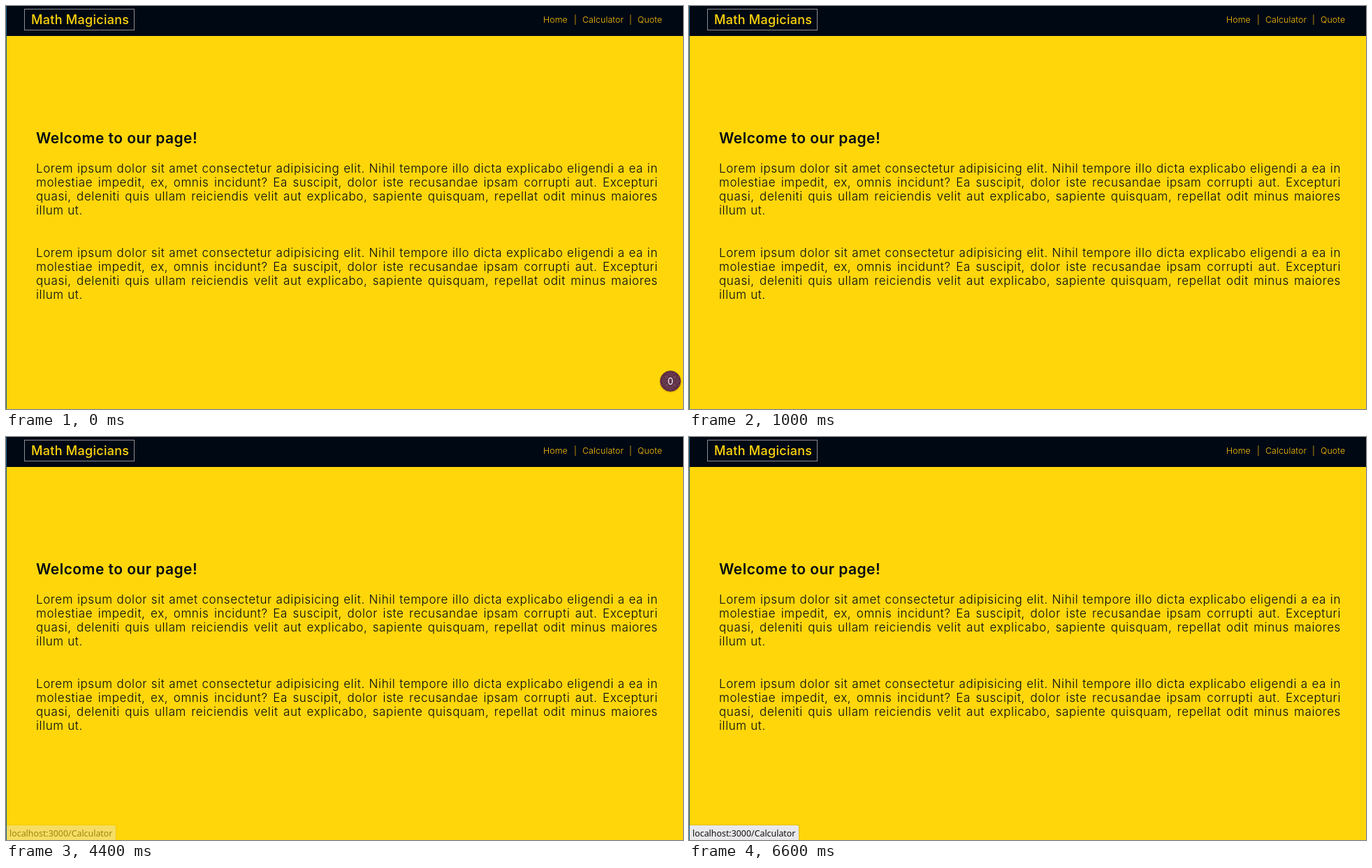
These frames come from a looping animation (969 px wide and 578 px high, 8000 ms). An HTML page:

```html
<!DOCTYPE html>
<html lang="en">
<head>
<meta charset="utf-8">
<title>Math Magicians</title>
<style>
  html, body { margin: 0; width: 100%; height: 100%; overflow: hidden; }
  body { position: relative; background: #ffd60a; color: #000814; font-family: Inter, "Open Sans", sans-serif; line-height: 20px; white-space: nowrap; }
  header, header *, h1, h2, main p, #edge, #counter, #status { position: absolute; margin: 0; box-sizing: border-box; }
  header { left: 0; top: 0; width: 100%; height: 43px; background: #000814; }
  h1 { left: 26px; top: 4px; width: 158px; height: 31px; border: 1px solid #8a8d93; padding: 5px 0 0 9px; color: #ffd60a; font-size: 18px; font-weight: 500; letter-spacing: .28px; }
  nav span { top: 10px; color: #ffc300; font-size: 12.3px; font-weight: 350; letter-spacing: .15px; }
  #edge { left: 0; top: 0; width: 1px; height: 100%; background: #1d5f86; }
  h2 { left: 43px; top: 180px; font-size: 21px; font-weight: 560; letter-spacing: .45px; }
  main p { left: 43px; width: 890px; font-size: 17px; font-weight: 350; letter-spacing: .6px; }
  main p span { display: block; text-align: justify; text-align-last: justify; }
  main p span:last-child { text-align-last: left; }
  #counter { left: 936px; top: 523px; width: 30px; height: 30px; border-radius: 50%; border: 1px solid #4b1230; color: #eee; font: 14px/28px "Noto Sans", sans-serif; text-align: center;
    background: repeating-radial-gradient(circle, #481a30 0 1px, #82546a 1px 2px); box-shadow: 0 1px 2px rgba(80, 40, 0, .3); }
  #status { left: 1px; bottom: 0; width: 157px; height: 22px; padding-left: 4px; border: solid rgba(0, 0, 0, .12); border-width: 1px 1px 0 0; border-top-right-radius: 3px; background: #e9e9eb padding-box; color: #111; font: 12.4px/24px "Noto Sans", sans-serif; }
</style>
</head>
<body>
<header><h1>Math Magicians</h1><nav></nav></header>
<main><h2>Welcome to our page!</h2></main>
<div id="edge"></div>
<div id="counter">0</div>
<div id="status">localhost:3000/Calculator</div>
<script>
  const LOOP = 8000;
  const lines = [
    "Lorem ipsum dolor sit amet consectetur adipisicing elit. Nihil tempore illo dicta explicabo eligendi a ea in",
    "molestiae impedit, ex, omnis incidunt? Ea suscipit, dolor iste recusandae ipsam corrupti aut. Excepturi",
    "quasi, deleniti quis ullam reiciendis velit aut explicabo, sapiente quisquam, repellat odit minus maiores",
    "illum ut."
  ];
  const links = [["Home", 769], ["|", 813], ["Calculator", 825], ["|", 892], ["Quote", 904]];
  const counter = document.getElementById("counter");
  const status = document.getElementById("status");

  function add(parent, tag, text = "") {
    const el = document.createElement(tag);
    el.textContent = text;
    return parent.appendChild(el);
  }

  for (const [label, x] of links) {
    add(document.querySelector("nav"), "span", label).style.left = x + "px";
  }
  for (const top of [223, 344]) {
    const p = add(document.querySelector("main"), "p");
    p.style.top = top + "px";
    lines.forEach(line => add(p, "span", line));
  }

  function draw(now) {
    const t = now % LOOP;
    counter.style.visibility = t < 1000 ? "visible" : "hidden";
    status.style.opacity = t < 4400 ? 0 : t < 4500 ? 0.4 : 1;
    requestAnimationFrame(draw);
  }
  draw(performance.now());
</script>
</body>
</html>
```
